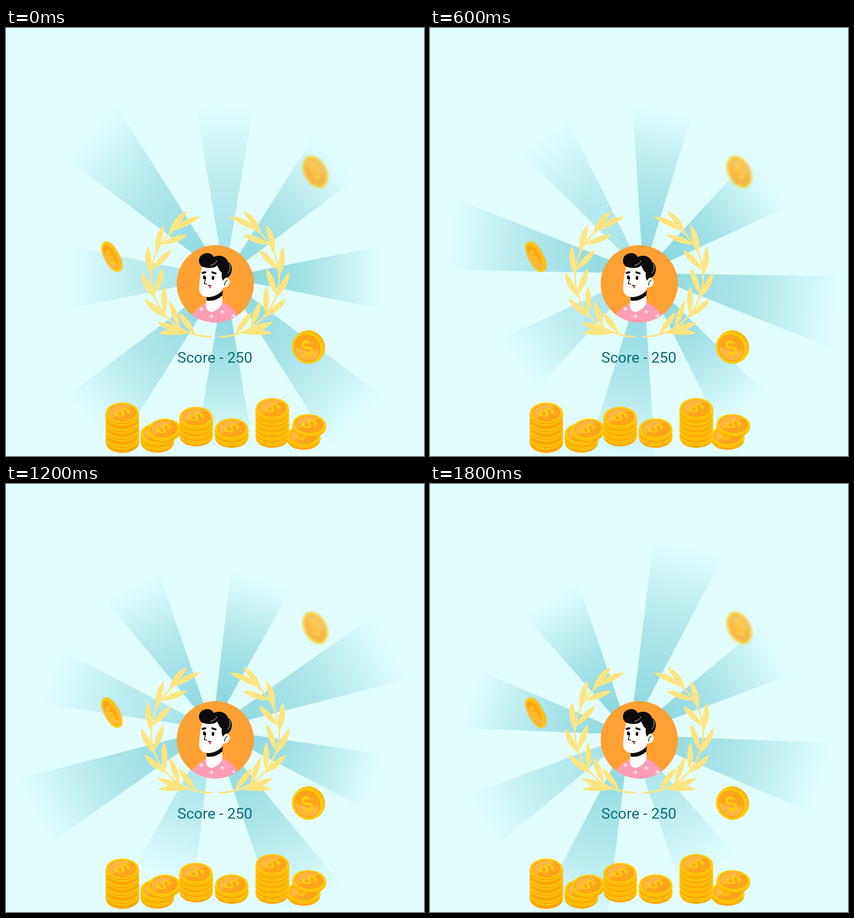
An HTML page for the animation above (2000 ms loop, 740 by 757 pixels).

```html
<!DOCTYPE html>
<html lang="en">
<head>
<meta charset="utf-8">
<title>Score</title>
<style>
  html, body { margin: 0; width: 100%; height: 100%; overflow: hidden; background: #e2fdff; }
  svg { display: block; }
  text { font: 26.6px Roboto, sans-serif; fill: #0b6d77; text-anchor: middle; }
</style>
</head>
<body>
<svg width="740" height="757" viewBox="0 0 740 757">
  <defs>
    <linearGradient id="fade" x1="0" y1="1" x2="0" y2="0">
      <stop offset="0" stop-color="#76ced7"/>
      <stop offset=".55" stop-color="#76ced7" stop-opacity=".58"/>
      <stop offset="1" stop-color="#76ced7" stop-opacity="0"/>
    </linearGradient>
    <clipPath id="disc"><circle cx="370.5" cy="452.5" r="68.5"/></clipPath>
    <g id="face">
      <circle r="100" fill="#ffcb08"/>
      <circle r="82" fill="#ffa51c"/>
      <path d="M-82 0A82 82 0 0 1 58 -58Q-20 -30 -58 58A82 82 0 0 1 -82 0Z" fill="#ffb640"/>
      <circle r="82" fill="none" stroke="#f49b12" stroke-width="4"/>
    </g>
    <path id="dollar" d="M25 -24C12 -48 -32 -40 -26 -16C-20 6 28 -6 26 18C22 43 -20 42 -28 24M0 -38V-50M0 38V50"
      fill="none" stroke="#ffd010" stroke-width="14"/>
  </defs>

  <g id="rays" fill="url(#fade)"></g>
  <g id="laurel" fill="#fde581"></g>

  <g clip-path="url(#disc)">
    <circle cx="370.5" cy="452.5" r="68.5" fill="#ffa033"/>
    <path d="M326 525L329 507Q338 494 354 487L383 485Q402 492 413 512V525Z" fill="#ff9db5"/>
    <path d="M355 470L354 490Q355 502 364 502Q374 501 383 488L382 462Z" fill="#fff"/>
    <path d="M355 475Q372 476 384 464L383 473Q370 485 355 482Z" fill="#0b0b0b"/>
    <path d="M348 420Q343 435 342 460Q342 475 358 476Q377 475 385 459Q395 459 396 448Q394 440 386 442L388 420Z" fill="#fff"/>
    <path d="M347 422C338 415 341 401 352 399C359 396 365 400 368 405C377 400 391 404 393 414C404 419 400 437 393 441Q388 440 384 447Q381 440 382 433Q376 427 374 420Q365 428 347 422Z" fill="#0b0b0b"/>
    <path d="M362 420Q371 418 374 411M392 434Q399 428 396 418" fill="none" stroke="#fff" stroke-width=".8"/>
    <g fill="none" stroke="#0b0b0b" stroke-linecap="round">
      <path d="M348 433L353 432M365 432L371 434" stroke-width="3.4"/>
      <path d="M354 441L351 452L355 453" stroke-width="1.4"/>
      <path d="M392 446Q387 448 387 455" stroke-width="1.2"/>
      <path d="M358 455L363 456" stroke-width="1.6"/>
    </g>
    <ellipse cx="351" cy="441" rx="2.3" ry="3.5"/>
    <ellipse cx="366.5" cy="442" rx="2.3" ry="3.5"/>
    <path d="M359 457H363Q363 461 360 460Z" fill="#ee4a4a"/>
    <path d="M342.5 497h7m-3.5-3.5v7M379.5 502h7m-3.5-3.5v7M360.5 510h7m-3.5-3.5v7M399.5 509h7m-3.5-3.5v7" stroke="#fff" stroke-width="1.5"/>
  </g>

  <text x="369.7" y="592.3">Score - 250</text>
  <g id="coins"></g>
</svg>
<script>
const el = id => document.getElementById(id);
const rad = deg => deg * Math.PI / 180;
const repeat = (n, fn) => Array.from({ length: n }, (_, i) => fn(i)).join('');

// Eight even rays, stretched a little in height; the diagonal ones reach further.
function ray(i) {
  const diagonal = i % 2, length = diagonal && i > 1 ? 334 : 277;
  const w = length * Math.tan(rad(10.4));
  const opacity = diagonal ? .85 : .78 + .22 * Math.cos(rad(45 * i - 135));
  return `<path d="M0 0L${-w} ${-length}H${w}Z" opacity="${opacity}"
    transform="translate(387 441) scale(1 1.09) rotate(${45 * i})"/>`;
}
el('rays').innerHTML = repeat(8, ray);

// Polar point on the wreath; the angle runs clockwise from the bottom.
const STEM = 106;
const polar = (deg, r) => [363 - r * Math.sin(rad(deg)), 440 + r * Math.cos(rad(deg))];

// A leaf grows from the stem to its tip, bent to the outside.
function leaf(from, to, r, bend = 0) {
  const [x, y] = polar(from, STEM), [tx, ty] = polar(to, r);
  const dx = tx - x, dy = ty - y, len = Math.hypot(dx, dy);
  const side = s => {
    const k = (bend + s * 10.5) / len;
    return `${x + dx * .58 + dy * k} ${y + dy * .58 - dx * k}`;
  };
  return `<path d="M${x} ${y}Q${side(1)} ${tx} ${ty}Q${side(-1)} ${x} ${y}Z"/>`;
}
const branch =
  repeat(6, i => {
    const outer = 50 + 22 * i, inner = 43 + 15.5 * i + 1.2 * i * i;
    return leaf(outer - 25, outer, 124, 4) + leaf(inner - 28, inner, 85);
  }) +
  leaf(20, 43, 137, -4) + leaf(140, 170, 108, 4) +
  `<path d="M${polar(0, STEM)}A${STEM} ${STEM} 0 0 1 ${polar(140, STEM)}" fill="none"
    stroke="#fde581" stroke-width="3" stroke-linecap="round"/>`;
el('laurel').innerHTML = branch + `<g transform="translate(740.6) scale(-1 1)">${branch}</g>`;

// One coin: the edge runs from the face along the local y axis.
function coin(x, y, rx, ry, h, turn = 0, spin = 58, style = '') {
  return `<g transform="translate(${x} ${y}) rotate(${turn})" style="${style}">
    <path d="M${-rx} 0V${h}A${rx} ${ry} 0 0 0 ${rx} ${h}V0Z" fill="#ffa608"/>
    <path d="M${-rx} ${h / 3}A${rx} ${ry} 0 0 0 ${rx} ${h / 3}" fill="none" stroke="#ffcb08" stroke-width="2"/>
    <g transform="scale(${rx / 100} ${ry / 100})"><use href="#face"/>
    <use href="#dollar" transform="rotate(${spin})"/></g></g>`;
}
const stack = (x, y, count, pitch = 9) =>
  repeat(count, i => coin(x, y + (count - 1 - i) * pitch, 29.3, 18, pitch * .8));

el('coins').innerHTML =
  stack(206, 680.5, 4, 14) +
  stack(268, 717, 2) + coin(279.5, 709, 28.5, 18, 6, -6) +
  stack(336.5, 688, 4) +
  stack(399.5, 708.5, 2) +
  stack(471.5, 672.5, 6) +
  stack(527, 721, 1) + coin(537, 701, 29.5, 18, 5, 4) +
  coin(533.5, 566, 29, 26.5, 5, -127, 112) +
  coin(547.5, 254.5, 30, 20, -5, 62, -70, 'filter:blur(2px);opacity:.8') +
  coin(185.5, 405.5, 29, 11.5, 4, -118, 90, 'filter:blur(.9px)');

function draw(now) {
  const step = Math.floor(now % 2000 / 200);
  const turns = step < 9 ? step : 10; // the last step is a double one
  el('rays').setAttribute('transform', `rotate(${-12 * turns} 371 452)`);
  requestAnimationFrame(draw);
}
draw(performance.now());
</script>
</body>
</html>
```
